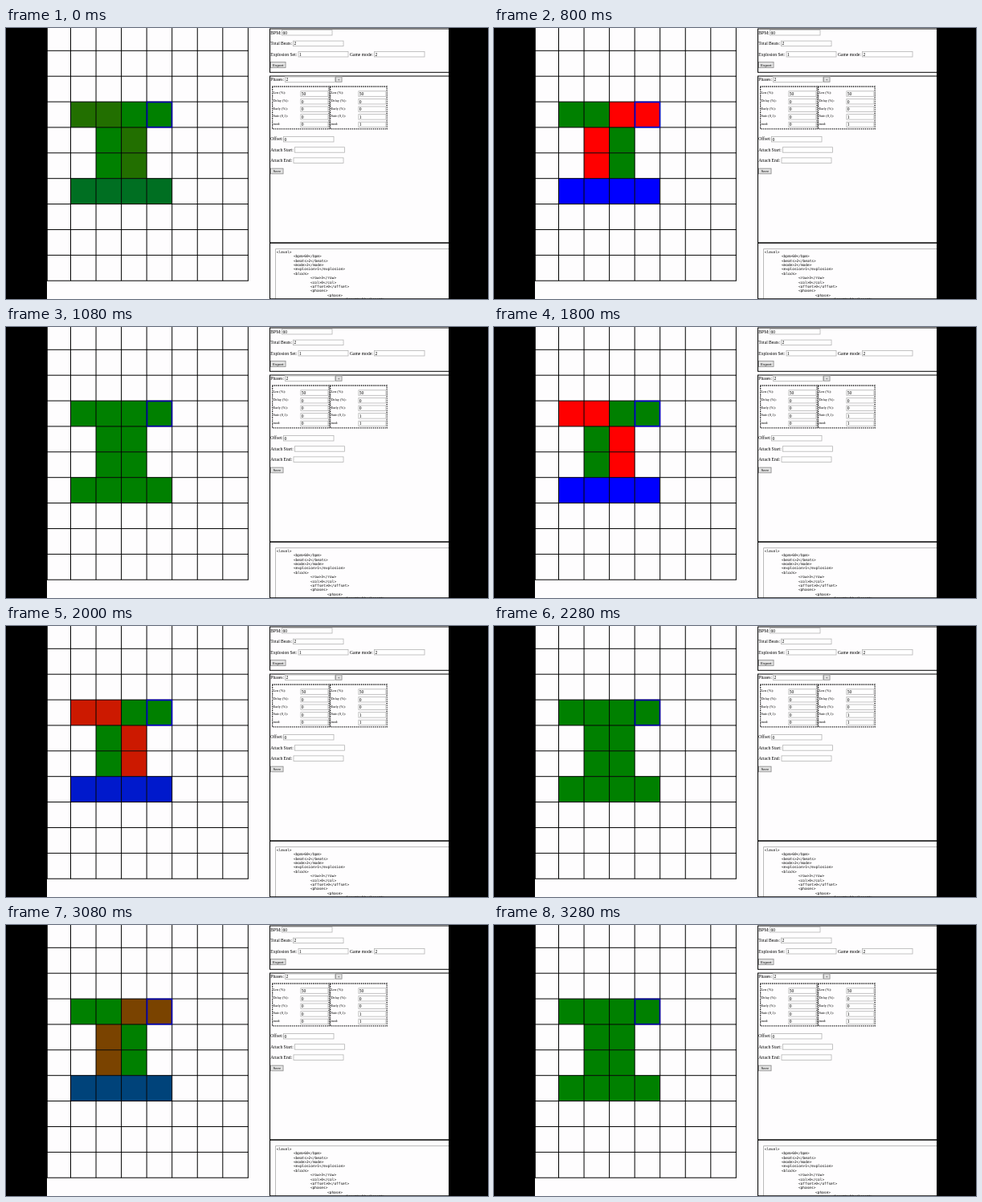
These frames come from a looping animation (600x338 px, 3.48 s). An HTML page with a canvas:

```html
<!DOCTYPE html>
<html lang="en">
<head>
<meta charset="utf-8">
<title>Level editor</title>
<style>
html, body { margin: 0; width: 100%; height: 100%; overflow: hidden; background: #000; }
canvas { display: block; width: 600px; height: 338px; }
</style>
</head>
<body>
<canvas id="stage"></canvas>
<script>
const W = 600, H = 338, LOOP = 3480, STEP = 40;
const canvas = document.getElementById('stage');
const ctx = canvas.getContext('2d');
const dpr = window.devicePixelRatio || 1;
canvas.width = W * dpr;
canvas.height = H * dpr;

const SERIF = '"Liberation Serif", "Times New Roman", serif';
const MONO = '"DejaVu Sans Mono", "Liberation Mono", monospace';
const RED = [255, 0, 0], GREEN = [0, 128, 0], BLUE = [0, 0, 255];

// Each flash holds its colours, then fades to green between start and end.
const beats = [
  { at: 0, start: -290, end: 90, left: true },
  { at: 800, start: 860, end: 1070, left: false },
  { at: 1800, start: 1900, end: 2240, left: true },
  { at: 2880, start: 2900, end: 3250, left: false }
];

const colX = i => 80.5 + i * 31.55;
const rowY = i => 28.3 + i * 31.88;

function rect(x, y, w, h, fill) {
  ctx.fillStyle = fill;
  ctx.fillRect(x, y, w, h);
}

function frame(x, y, w, h, color, width = 1) {
  ctx.strokeStyle = color;
  ctx.lineWidth = width;
  ctx.strokeRect(x, y, w, h);
}

function line(x1, y1, x2, y2, color = '#000', width = 1) {
  ctx.strokeStyle = color;
  ctx.lineWidth = width;
  ctx.beginPath();
  ctx.moveTo(x1, y1);
  ctx.lineTo(x2, y2);
  ctx.stroke();
}

function text(str, x, y, size = 5.6, family = SERIF) {
  ctx.font = size + 'px ' + family;
  ctx.fillStyle = '#000';
  ctx.fillText(str, x, y);
}

function field(x, y, w, value = '') {
  rect(x, y, w, 7, '#fff');
  frame(x + 0.5, y + 0.5, w - 1, 6.5, '#b4b4b4', 0.8);
  text(value, x + 1.4, y + 5.6);
}

function button(label, x, y, w, h) {
  rect(x, y, w, h, '#e2e2e2');
  frame(x + 0.5, y + 0.5, w - 1, h - 1, '#909090', 0.8);
  ctx.textAlign = 'center';
  text(label, x + w / 2, y + h / 2 + 1.7, 5);
  ctx.textAlign = 'left';
}

function phaseTable(x, values) {
  ctx.setLineDash([1.2, 1.2]);
  frame(x, 73, 70.5, 52.8, '#000', 1.3);
  ctx.setLineDash([]);
  ['Len (%):', 'Delay (%):', 'Early (%):', 'Safe (0,1):', 'mod:'].forEach((label, i) => {
    const y = 78.3 + i * 9.6;
    text(label, x + 0.8, y + 4, 4.4);
    field(x + 34.8, y, 35, values[i]);
  });
}

function settings() {
  line(328, 1, 551, 1);
  line(328.5, 1, 328.5, 55);
  line(328, 55.3, 551, 55.3);
  text('BPM:', 329.3, 8.2);
  field(343, 2, 63.5, '60');
  text('Total Beats:', 329.3, 21.4);
  field(357, 15.6, 63.5, '2');
  text('Explosion Set:', 329.3, 34.6);
  field(363.5, 29, 63, '1');
  text('Game mode:', 428, 34.6);
  field(458, 29, 63.5, '2');
  button('Export', 329, 42, 19.5, 8);
}

function phasePanel() {
  line(328, 60, 551, 60);
  line(328.5, 60, 328.5, 268);
  line(328, 268, 551, 268, '#000', 1.3);
  text('Phases:', 329.3, 66.2);
  field(347, 60.5, 63, '2');
  button('+', 410, 60.5, 8.5, 7.2);
  phaseTable(331.6, ['50', '0', '0', '0', '0']);
  phaseTable(403.6, ['50', '0', '0', '1', '1']);
  text('Offset:', 329.3, 140.3);
  field(345, 135, 63.5, '0');
  text('Attach Start:', 329.3, 153.6);
  field(359, 148.2, 63);
  text('Attach End:', 329.3, 166.8);
  field(357.5, 161.4, 63);
  button('Save', 329, 174.7, 16.5, 7.6);
}

function codePanel() {
  line(328.5, 268, 328.5, H);
  line(335.5, 275.5, 551, 275.5, '#aaa', 0.8);
  line(335.5, 275.5, 335.5, H, '#aaa', 0.8);
  const code = [
    [0, '<level>'], [1, '<bpm>60</bpm>'], [1, '<beats>2</beats>'],
    [1, '<mode>2</mode>'], [1, '<explosion>1</explosion>'], [1, '<block>'],
    [2, '<row>3</row>'], [2, '<col>0</col>'], [2, '<offset>0</offset>'],
    [2, '<phases>'], [3, '<phase>'], [4, '<length>50</length>']
  ];
  code.forEach(([tab, str], i) => text(str, 336.8 + tab * 21.1, 280.8 + i * 5.39, 4.45, MONO));
  line(328, 337.6, 551, 337.6, '#000', 0.8);
}

function fadeAt(t) {
  const beat = beats.filter(b => b.at <= t).pop();
  const p = Math.min(1, Math.max(0, (t - beat.start) / (beat.end - beat.start)));
  return { left: beat.left, mix: 0.5 - 0.5 * Math.cos(p * Math.PI) };
}

function cell(col, row, color, mix) {
  const rgb = color.map((c, i) => Math.round(c + (GREEN[i] - c) * mix));
  rect(colX(col), rowY(row), 31.55, 31.88, `rgb(${rgb})`);
}

function board(t) {
  const { left, mix } = fadeAt(t);
  const side = isLeft => isLeft === left ? RED : GREEN;
  for (let c = 0; c < 4; c++) {
    cell(c, 2, side(c < 2), mix);
    cell(c, 5, BLUE, mix);
  }
  for (let r = 3; r < 5; r++) {
    cell(1, r, side(false), mix);
    cell(2, r, side(true), mix);
  }
  for (let c = 0; c < 8; c++) line(colX(c), 0, colX(c), rowY(9));
  for (let r = 0; r < 10; r++) line(51, rowY(r), colX(7) + 0.5, rowY(r));
  line(51.3, 0, 51.3, rowY(9));
  const glow = Math.round(215 - 45 * mix);
  frame(colX(3) + 0.4, rowY(2) + 0.4, 30.9, 31.2, `rgb(0,0,${glow})`, 1.6);
}

function draw(now) {
  const t = Math.floor((now % LOOP) / STEP) * STEP;
  ctx.setTransform(dpr, 0, 0, dpr, 0, 0);
  rect(0, 0, W, H, '#000');
  rect(51, 0, 500, H, '#fefdfe');
  ctx.save();
  ctx.beginPath();
  ctx.rect(51, 0, 500, H);
  ctx.clip();
  board(t);
  settings();
  phasePanel();
  codePanel();
  ctx.restore();
}

let origin;
function tick(now) {
  origin ??= now;
  draw(now - origin);
  requestAnimationFrame(tick);
}
draw(0);
requestAnimationFrame(tick);
</script>
</body>
</html>
```
